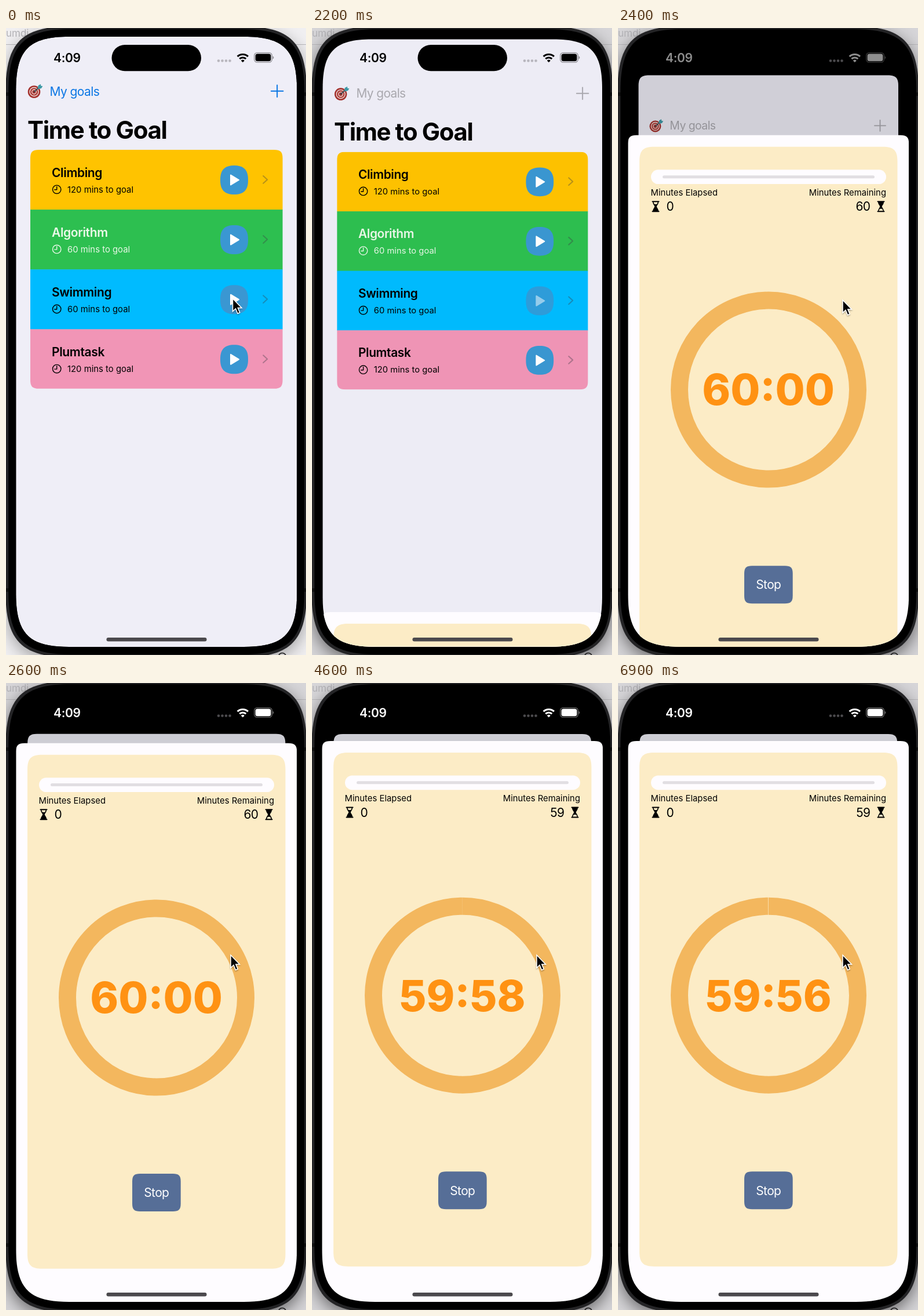
An HTML page that plays this animation: 518 px wide and 1081 px high, repeating every 7 s.

```html
<!DOCTYPE html>
<html lang="en">
<head>
<meta charset="utf-8">
<title>Time to Goal</title>
<style>
  html, body { margin: 0; width: 100%; height: 100%; overflow: hidden; background: #000; }
  svg { display: block; width: 100vw; height: 100vh; }
  text { font-family: Inter, Roboto, "Liberation Sans", sans-serif; font-optical-sizing: none; white-space: pre; }
  .body { font-size: 21px; letter-spacing: -0.6px; }
  .name { font-size: 21px; font-weight: 600; letter-spacing: -0.35px; }
  .small { font-size: 14.8px; letter-spacing: 0.03px; }
  .large { font-size: 42px; font-weight: 700; letter-spacing: -1.35px; }
  .timer { font-size: 74px; font-weight: 800; font-feature-settings: "calt" 1; }
  .line { fill: none; stroke-linecap: round; stroke-linejoin: round; }
</style>
</head>
<body>
<svg id="stage" viewBox="0 0 518 1081" preserveAspectRatio="none"></svg>
<script>
const LOOP = 7000, STEP = 100;
const PRESENT = 2178, STIFFNESS = 18.257; // spring start (ms) and rate (1/s)
const PRESS = 2000, FIRST_TICK = 3350;
const TOTAL = 3600, RING = 2 * Math.PI * 154;
const SCREEN = { x: 17.25, y: 15, w: 485, h: 1052, r: 68 };
const LIST_TOP = 210, ROW = 103.1;

const clamp = v => Math.min(1, Math.max(0, v));
const mix = (a, b, p) => a + (b - a) * p;
const pad = n => String(n).padStart(2, "0");

// Rounded rectangle with continuous corners
function squircle(x, y, w, h, r) {
  const e = Math.min(1.35 * r, w / 2, h / 2), k = (2.343 * r - e) / 3;
  const X = x + w, Y = y + h;
  return `M${x + e} ${y}H${X - e}C${X - k} ${y} ${X} ${y + k} ${X} ${y + e}` +
    `V${Y - e}C${X} ${Y - k} ${X - k} ${Y} ${X - e} ${Y}` +
    `H${x + e}C${x + k} ${Y} ${x} ${Y - k} ${x} ${Y - e}` +
    `V${y + e}C${x} ${y + k} ${x + k} ${y} ${x + e} ${y}Z`;
}

const shape = (x, y, w, h, r, fill, more = "") =>
  `<path d="${squircle(x, y, w, h, r)}" fill="${fill}" ${more}/>`;
const rect = (x, y, w, h, r, fill, more = "") =>
  `<rect x="${x}" y="${y}" width="${w}" height="${h}" rx="${r}" fill="${fill}" ${more}/>`;
const text = (x, y, cls, str, more = "") =>
  `<text x="${x}" y="${y}" class="${cls}" ${more}>${str}</text>`;
const dot = (x, y, r, fill) => `<circle cx="${x}" cy="${y}" r="${r}" fill="${fill}"/>`;

const rows = [
  ["Climbing", 120, "#ffc300", "#000"],
  ["Algorithm", 60, "#2dbf50", "#eaf8e8"],
  ["Swimming", 60, "#00bbff", "#000"],
  ["Plumtask", 120, "#f195b6", "#000"]
];

function row([name, mins, fill, ink], i) {
  return `<g transform="translate(0 ${LIST_TOP + i * ROW})">
    <rect x="42" width="436" height="${ROW + 0.5}" fill="${fill}"/>
    <g fill="${ink}">${text(79, 46.5, "name", name)}${text(106, 73.5, "small", mins + " mins to goal")}</g>
    <g class="line" stroke="${ink}" stroke-width="1.4">
      <circle cx="87.7" cy="68.3" r="7.2"/><path d="M87.7 63.5V68.8H83.8"/></g>
    ${shape(370, 27, 48, 50, 20, "#3a97d2", `id="button${i}"`)}
    <path id="play${i}" d="M388 43.5V60.5L402 52Z" fill="#fff" stroke="#fff" stroke-width="2" stroke-linejoin="round"/>
    <path class="line" d="M444.2 45L451.2 51.4L444.2 57.8" stroke="#3c3c43" stroke-opacity=".36" stroke-width="2.1"/>
  </g>`;
}

const bullseye =
  dot(48.5, 110, 10.8, "#a5322e") + dot(48.5, 110, 8.2, "#eadfda") + dot(48.5, 110, 6.8, "#b03934") +
  dot(48.5, 110, 4.4, "#eadfda") + dot(48.5, 110, 3.1, "#a5322e") +
  `<path class="line" d="M48.5 110L58 101.5" stroke="#3b4a52" stroke-width="1.8"/>
   <path d="M54.5 104L55.8 99L60 96.8L60.3 99.8L63.4 100.2L61 104L56.6 105.3Z" fill="#3e9aa6"/>`;

const home = `
  ${bullseye}
  <g id="nav">${text(75.5, 116.5, "body", "My goals")}
    <path class="line" d="M457.9 108.8H478.5M468.2 98.5V119.1" stroke="currentColor" stroke-width="2"/></g>
  ${text(37, 190.5, "large", "Time to Goal")}
  <g clip-path="url(#listClip)">${rows.map(row).join("")}</g>`;

// Hourglass with the filled bulb at the bottom
const hourglass = (x, turn) => `<g transform="translate(${x} 223) rotate(${turn})">
  <path class="line" d="M-5.5 -8.5H5.5M-5.5 8.5H5.5" stroke="#000" stroke-width="2"/>
  <path class="line" d="M-4.3 -8C-4.3 -3.5 -1 -2.5 -1 0C-1 2.5 -4.3 3.5 -4.3 8H4.3C4.3 3.5 1 2.5 1 0C1 -2.5 4.3 -3.5 4.3 -8" stroke="#000" stroke-width="1.6"/>
  <path d="M-4.3 8C-4.3 3.5 -1 2.5 -1 -1H1C1 2.5 4.3 3.5 4.3 8ZM-3 -4H3L0 0Z"/></g>`;

const sheet = `
  ${shape(SCREEN.x, 100, SCREEN.w, 1100, 11, "#fefcff")}
  ${shape(37, 120, 445.5, 886, 19, "#fcecc6")}
  ${rect(57, 159.5, 406, 24.7, 12.3, "#fefcff")}
  ${rect(77, 169.3, 366, 5, 2.5, "#e1dee2")}
  ${text(56.5, 204, "small", "Minutes Elapsed")}
  ${text(463, 204, "small", "Minutes Remaining", 'text-anchor="end"')}
  ${hourglass(65, 0)}${hourglass(454, 180)}
  ${text(83.5, 230.5, "body", "0")}
  ${text(435.5, 230.5, "body", "60", 'id="left" text-anchor="end"')}
  <circle id="ring" cx="260" cy="538.7" r="154" fill="none" stroke="#f3b75e" stroke-width="30" transform="rotate(-90 260 538.7)"/>
  ${text(259.7, 565.5, "timer", "60:00", 'id="timer" text-anchor="middle" fill="#ff9213"')}
  ${shape(218, 842.3, 83.7, 65, 10, "#566e97")}
  ${text(259.8, 882.5, "body", "Stop", 'text-anchor="middle" fill="#fff"')}`;

const status = `
  ${text(82, 58.5, "name", "4:09")}
  <g fill="#8a898e" fill-opacity=".55">${[367, 373.5, 380, 386.5].map(x => `<circle cx="${x}" cy="56.5" r="2.3"/>`).join("")}</g>
  <g class="line" stroke="currentColor" stroke-width="3.2" style="stroke-linecap:butt">
    <path d="M399.7 49.2A13 13 0 0 1 417.9 49.2"/><path d="M403.3 53.2A8 8 0 0 1 414.3 53.2"/></g>
  <path d="M408.8 59.3L405.8 56.2A4.3 4.3 0 0 1 411.8 56.2Z"/>
  <rect x="428.7" y="42.6" width="30.6" height="16.6" rx="5" fill="none" stroke="currentColor" stroke-opacity=".4" stroke-width="1.3"/>
  ${rect(430.6, 44.5, 26.8, 12.8, 3.5, "currentColor")}
  <path d="M460.6 48.2V53.8Q462.4 52.8 462.4 51Q462.4 49.2 460.6 48.2Z" opacity=".45"/>`;

const screenPath = squircle(SCREEN.x, SCREEN.y, SCREEN.w, SCREEN.h, SCREEN.r);

document.getElementById("stage").innerHTML = `
  <defs>
    <clipPath id="screenClip"><path d="${screenPath}"/></clipPath>
    <clipPath id="listClip"><path d="${squircle(42, LIST_TOP, 435.6, ROW * 4 - 0.6, 11)}"/></clipPath>
    <filter id="blur" x="-20%" y="-20%" width="140%" height="140%"><feGaussianBlur stdDeviation="14"/></filter>
    <filter id="soft" x="-50%" y="-50%" width="200%" height="200%"><feDropShadow dx="0" dy="1.5" stdDeviation="1.2" flood-opacity=".35"/></filter>
  </defs>
  <rect id="desk" width="518" height="1081"/>
  <path d="M0 28.5H518" stroke="#b9b8bb"/>
  ${text(0, 14.5, "", "umdi", 'font-size="17" fill="#b4b3b7"')}
  <circle cx="477" cy="1084" r="6.5" fill="none" stroke="#222" stroke-width="1.5"/>
  ${shape(-0.75, 6, 520, 1088, 84, "#000", 'id="shade" filter="url(#blur)"')}
  ${shape(-0.75, -3, 520, 1088, 84, "#242426")}
  <path d="M-1 114H6M-1 969H6M512 114H519M512 969H519" stroke="#111" stroke-width="6"/>
  ${shape(4.25, 2, 511, 1078, 80, "#000")}
  <g clip-path="url(#screenClip)">
    <g id="card"><path id="cardFace" fill="#efeef7"/>${home}<path id="cardDim" fill="#000"/></g>
    <g id="sheet">${sheet}</g>
  </g>
  ${rect(182.5, 29, 154.5, 45.3, 22.6, "#000")}
  <g id="status" fill="currentColor">${status}</g>
  ${rect(173.5, 1051, 173, 6.4, 3.2, "#4b494d")}
  <path id="cursor" d="M0 0V22L5 17.3L8.5 25.7L12.2 24.1L8.8 16H15.4Z" fill="#000" stroke="#fff" stroke-width="1.5" filter="url(#soft)"/>`;

const $ = id => document.getElementById(id);
const set = (id, attrs) => {
  for (const key in attrs) $(id).setAttribute(key, attrs[key]);
};

function drawSheet(t) {
  const x = STIFFNESS * Math.max(0, t - PRESENT) / 1000;
  const p = 1 - (1 + x) * Math.exp(-x);
  const scale = (SCREEN.w - 40 * p) / SCREEN.w;
  const radius = mix(12, SCREEN.r, Math.pow(1 - p, 1.5)) / scale;
  const face = squircle(SCREEN.x, SCREEN.y, SCREEN.w, SCREEN.h, radius);
  set("card", {
    transform: `translate(${SCREEN.x + 20 * p} ${SCREEN.y + 73 * p}) scale(${scale}) translate(${-SCREEN.x} ${-SCREEN.y})`
  });
  set("cardFace", { d: face });
  set("cardDim", { d: face, "fill-opacity": 0.14 * p });
  set("sheet", { transform: `translate(0 ${967 * (1 - p)})`, visibility: x > 0 ? "visible" : "hidden" });

  const tint = x > 0 ? "#aaa9af" : "#0a76e4";
  set("nav", { fill: tint, color: tint });
  const grey = Math.round(255 * clamp((t - 2200) / 360));
  set("status", { color: `rgb(${grey},${grey},${grey})` });
}

function drawTimer(t) {
  const elapsed = t < FIRST_TICK ? 0 : 1 + Math.floor((t - FIRST_TICK) / 1000);
  const rest = TOTAL - elapsed, mins = Math.floor(rest / 60);
  $("timer").textContent = `${pad(mins)}:${pad(rest % 60)}`;
  $("left").textContent = mins;
  set("ring", { "stroke-dasharray": elapsed ? `${RING * rest / TOTAL} ${RING}` : "none" });
}

function drawPointer(t) {
  const p = clamp(t / 800), ease = p * p * (3 - 2 * p);
  const hidden = t > 2150 && t < 2350;
  set("cursor", {
    transform: `translate(${mix(391.5, 388, ease)} ${mix(466.5, 469, ease)})`,
    visibility: hidden ? "hidden" : "visible"
  });
  const pressed = t >= PRESS;
  set("button2", { opacity: pressed ? 0.8 : 1 });
  set("play2", { opacity: pressed ? 0.5 : 1 });
  set("desk", { fill: pressed ? "#d6d5d8" : "#f0eff1" });
  set("shade", { opacity: pressed ? 0.5 : 0.32 });
}

function frame() {
  const t = Math.floor(performance.now() % LOOP / STEP) * STEP;
  drawSheet(t);
  drawTimer(t);
  drawPointer(t);
  requestAnimationFrame(frame);
}
frame();
</script>
</body>
</html>
```
